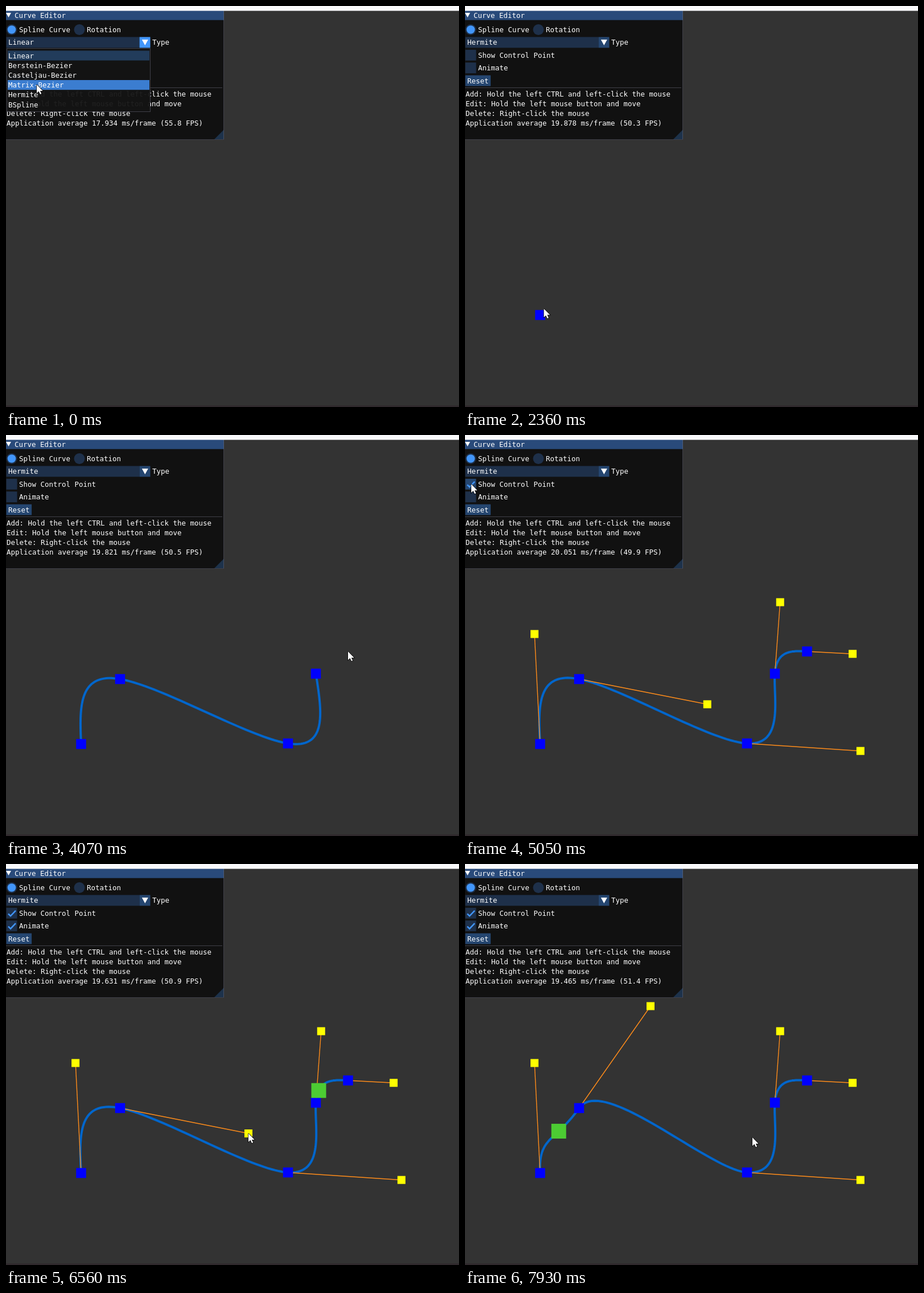
An HTML page with a canvas for the animation above (7.99 s loop, 796 px wide and 704 px high).

```html
<!DOCTYPE html>
<html lang="en">
<head>
<meta charset="utf-8">
<title>Curve Editor</title>
<style>
html, body { margin: 0; width: 796px; height: 704px; overflow: hidden; background: #333; }
canvas { display: block; }
</style>
</head>
<body>
<canvas id="stage" width="796" height="704"></canvas>
<script>
const ctx = document.getElementById('stage').getContext('2d');
const LOOP = 7990;

// Panel metrics: widget rows, text lines, character advance
const ROW = 22.4, LEAD = 17.2, CHAR = 7.5, BOX = 18.9, LEFT = 0.6;
const row = i => 41.5 + ROW * i;
const ACCENT = '#4296fa', FRAME = '#1e304a', BUTTON = '#254670', EDGE = 'rgba(110,110,128,.5)';

const TYPES = ['Linear', 'Berstein-Bezier', 'Casteljau-Bezier', 'Matrix-Bezier', 'Hermite', 'BSpline'];
const HELP = [
  'Add: Hold the left CTRL and left-click the mouse',
  'Edit: Hold the left mouse button and move',
  'Delete: Right-click the mouse'
];

// User actions in ms, and curve points as [time added, x, y]
const PRESS = 1150, CLOSE = 1250, SHOW = 5010, ANIMATE = 5450, DRAG = 6560, RELEASE = 7420;
const POINTS = [[2220, 132, 542.5], [2720, 200.5, 428.5], [3130, 495.5, 541.5],
  [3580, 544.5, 419], [4115, 601, 380]];
const LAG = 75;

const pause = (from, to, x, y) => [[from, x, y], [to, x, y]];
const MOUSE = [
  [300, 54, 138],
  ...pause(700, CLOSE, 47, 151),
  [1680, 148, 562],
  ...POINTS.flatMap(([t, x, y]) => pause(t - 40, t + 65, x, y)),
  ...pause(SHOW - 110, SHOW + 40, 11, row(2)),
  ...pause(ANIMATE - 50, ANIMATE + 50, 11, row(3)),
  [5770, 60, row(2)],
  ...pause(DRAG - 60, DRAG, 426, 473),
  [7060, 371, 301],
  [RELEASE, 326, 249.5],
  [7930, 505, 480]
];
const FRAME_MS = [[0, 17.932], [1200, 20.153], [2360, 19.878], [4070, 19.821],
  [5770, 20.22], [7060, 19.26], [7930, 19.465]];

const linear = f => f;
const smooth = f => f * f * (3 - 2 * f);

function track(keys, t, ease) {
  const next = keys.findIndex(k => k[0] > t);
  if (next <= 0) return keys.at(next).slice(1);
  const a = keys[next - 1], b = keys[next];
  const f = ease((t - a[0]) / (b[0] - a[0]));
  return a.slice(1).map((v, j) => v + (b[j + 1] - v) * f);
}

const mouseAt = t => track(MOUSE, t, smooth);

// Tangents of a natural cubic spline, solved per axis
function tangents(pts) {
  const n = pts.length, out = pts.map(() => [0, 0]);
  if (n < 2) return out;
  for (const k of [0, 1]) {
    const c = [], d = [];
    for (let i = 0; i < n; i++) {
      const end = i === 0 || i === n - 1;
      const rhs = 3 * (pts[Math.min(i + 1, n - 1)][k] - pts[Math.max(i - 1, 0)][k]);
      const w = (end ? 2 : 4) - (i ? c[i - 1] : 0);
      c[i] = 1 / w;
      d[i] = (rhs - (i ? d[i - 1] : 0)) / w;
    }
    for (let i = n - 1; i >= 0; i--) {
      out[i][k] = d[i] - (i < n - 1 ? c[i] * out[i + 1][k] : 0);
    }
  }
  return out;
}

function hermite(pts, tan, u) {
  const i = Math.min(Math.floor(u), pts.length - 2), s = u - i;
  const h = smooth(s), p = s * (1 - s) * (1 - s), q = s * s * (s - 1);
  return [0, 1].map(k =>
    pts[i][k] * (1 - h) + pts[i + 1][k] * h + tan[i][k] * p + tan[i + 1][k] * q);
}

function rect(x, y, w, h, color) {
  ctx.fillStyle = color;
  ctx.fillRect(x, y, w, h);
}

function square([x, y], size, color) {
  rect(x - size / 2, y - size / 2, size, size, color);
}

function path(pts) {
  ctx.beginPath();
  pts.forEach(p => ctx.lineTo(p[0], p[1]));
}

function poly(pts, color) {
  path(pts);
  ctx.fillStyle = color;
  ctx.fill();
}

function line(pts, color, width) {
  path(pts);
  ctx.strokeStyle = color;
  ctx.lineWidth = width;
  ctx.stroke();
}

function border(x, y, w, h) {
  ctx.strokeStyle = EDGE;
  ctx.lineWidth = 1;
  ctx.strokeRect(x + .5, y + .5, w - 1, h - 1);
}

function disc(x, y, r, color) {
  ctx.beginPath();
  ctx.arc(x, y, r, 0, Math.PI * 2);
  ctx.fillStyle = color;
  ctx.fill();
}

function text(str, x, mid) {
  ctx.fillStyle = '#fff';
  ctx.fillText(str, x, Math.round(mid + 4.5));
}

function frame(x, mid, w, color) {
  rect(x, mid - BOX / 2, w, BOX, color);
}

function downArrow(x, mid, w, h) {
  poly([[x - w / 2, mid - h / 2], [x + w / 2, mid - h / 2], [x, mid + h / 2]], '#fff');
}

function radio(label, x, on) {
  disc(x, row(0), BOX / 2, FRAME);
  if (on) disc(x, row(0), 7.3, ACCENT);
  text(label, x + 13, row(0));
}

function checkbox(label, mid, on, [mx, my]) {
  const hover = mx < 23 + label.length * CHAR && Math.abs(my - mid) < BOX / 2;
  frame(LEFT, mid, BOX, hover ? BUTTON : FRAME);
  if (on) line([[4, mid + 1], [8, mid + 5], [17, mid - 4.5]], ACCENT, 2.5);
  text(label, 23, mid);
}

function drawCurve(t) {
  const pts = POINTS.filter(p => t >= p[0]).map(p => p.slice(1));
  const tan = tangents(pts);
  if (t >= DRAG) {
    const grip = mouseAt(Math.min(Math.max(t - LAG, DRAG), RELEASE));
    tan[1] = grip.map((v, k) => v - pts[1][k]);
  }
  if (pts.length > 1) {
    const steps = (pts.length - 1) * 40;
    const curve = Array.from({ length: steps + 1 }, (_, i) => hermite(pts, tan, i / 40));
    line(curve, '#0066cc', 4);
  }
  if (t >= SHOW) {
    const ends = pts.map((p, i) => [p[0] + tan[i][0], p[1] + tan[i][1]]);
    ends.forEach((e, i) => line([pts[i], e], '#ff8c1a', 1.4));
    ends.forEach(e => square(e, 14, '#ffff00'));
  }
  pts.forEach(p => square(p, 17.5, '#0000ff'));
  if (t >= ANIMATE) {
    const u = (2.368 + (t - 5770) * .00107) % (pts.length - 1);
    square(hermite(pts, tan, u), 26, '#4ccc33');
  }
}

function drawPanel(t, mouse) {
  const open = t < CLOSE;
  rect(0, 6, 383, 229, '#111');
  rect(0, 6, 383, 18.7, '#294a7a');
  downArrow(4.5, 16, 9, 8);
  text('Curve Editor', 15, 16);

  radio('Spline Curve', 10, true);
  radio('Rotation', 129, false);

  frame(LEFT, row(1), 234, FRAME);
  frame(234.6, row(1), BOX, open ? ACCENT : BUTTON);
  downArrow(244.3, row(1), 11, 10);
  text(open ? TYPES[0] : TYPES[4], 4, row(1));
  text('Type', 257, row(1));

  checkbox('Show Control Point', row(2), t >= SHOW, mouse);
  checkbox('Animate', row(3), t >= ANIMATE, mouse);
  frame(LEFT, row(4), 44.5, BUTTON);
  text('Reset', 4, row(4));
  rect(0, 143, 380, 1, EDGE);

  const ms = track(FRAME_MS, t, linear)[0];
  const stats = `Application average ${ms.toFixed(3)} ms/frame (${(1000 / ms).toFixed(1)} FPS)`;
  [...HELP, stats].forEach((str, i) => text(str, 1, 154 + LEAD * i));

  poly([[383, 217], [383, 234], [366, 234]], '#1d324b');
  border(-1, 5, 384, 230);
  if (open) drawPopup(t, mouse);
}

function drawPopup(t, mouse) {
  const top = 78.4;
  rect(LEFT, 74, 252.9, 111.5, 'rgba(20,20,20,.94)');
  border(1, 74, 253, 112);
  const hover = Math.floor((mouse[1] - top) / LEAD);
  TYPES.forEach((name, i) => {
    const y = top + i * LEAD;
    if (i === 0) rect(3, y, 249, LEAD, '#223c5b');
    if (i === hover) rect(3, y, 249, LEAD, t >= PRESS ? ACCENT : '#3b7dd0');
    text(name, 4, y + LEAD / 2);
  });
}

function drawMouse([x, y]) {
  const arrow = [[0, 0], [0, 15], [3.5, 11.8], [6, 17], [8.3, 16], [5.9, 10.9], [10.7, 10.9], [0, 0]]
    .map(p => [x + p[0], y + p[1]]);
  line(arrow, '#000', 1.4);
  poly(arrow, '#fff');
}

function draw(t) {
  const mouse = mouseAt(t);
  ctx.font = '12.46px "DejaVu Sans Mono", monospace';
  rect(0, 0, 796, 704, '#333');
  rect(0, 701, 796, 3, '#302a2d');
  drawCurve(t);
  drawPanel(t, mouse);
  rect(0, 0, 796, 8.5, '#f9f9fb');
  drawMouse(mouse);
}

const start = performance.now();
function loop() {
  draw((performance.now() - start) % LOOP);
  requestAnimationFrame(loop);
}
loop();
</script>
</body>
</html>
```
